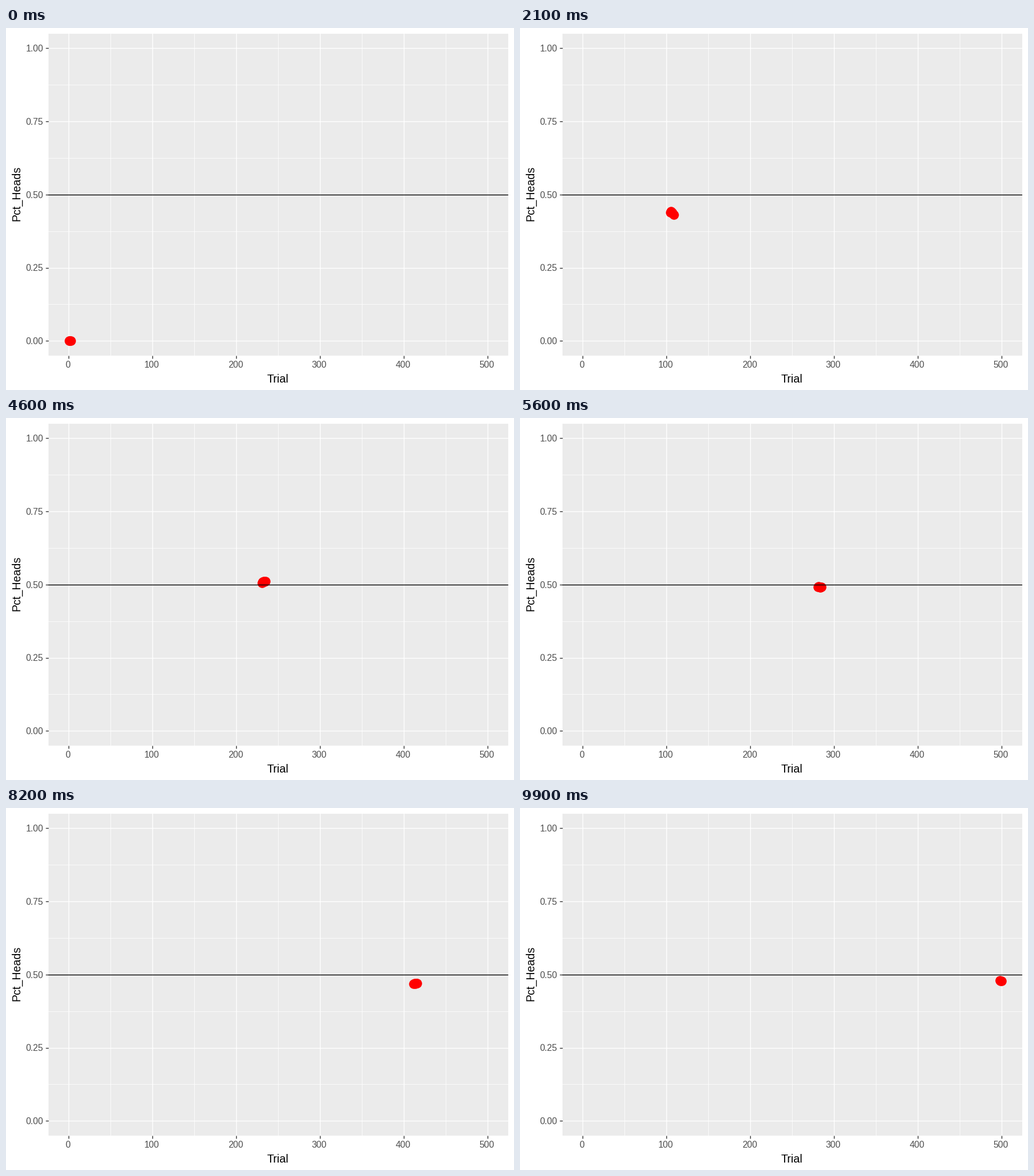
A matplotlib script that plays this animation: 885x632 px, repeating every 10 s.

```python
import numpy as np
import matplotlib.pyplot as plt
from matplotlib.animation import FuncAnimation

W, H, DPI = 885, 632, 100
LEFT, RIGHT, TOP, BOTTOM = 73.6, 875.2, 9.8, 571.9
FRAMES, TRIALS = 100, 500
PX = 72 / DPI  # points per pixel
TICK, TITLE = 15.6, 19.6

plt.rcParams["font.family"] = ["Liberation Sans", "DejaVu Sans"]

# (trial, heads so far) at the turning points; flips between are spread evenly.
TURNS = [(3, 0), (13, 7), (67, 25), (106, 47), (109, 47), (156, 77), (181, 89),
         (187, 89), (235, 120), (283, 139), (325, 157), (403, 186), (428, 205),
         (459, 213), (497, 239), (500, 239)]
trial = np.arange(1, TRIALS + 1)
pct = np.round(np.interp(trial, *zip(*TURNS))) / trial
shown_in = np.round((trial - 1) * (FRAMES - 1) / (TRIALS - 1)).astype(int)

fig = plt.figure(figsize=(W / DPI, H / DPI), dpi=DPI, facecolor="white")
ax = fig.add_axes([LEFT / W, 1 - BOTTOM / H, (RIGHT - LEFT) / W, (BOTTOM - TOP) / H],
                  facecolor="#EBEBEB")
pad = 0.05 * (TRIALS - 1)
ax.set_xlim(1 - pad, TRIALS + pad)
ax.set_ylim(-0.05, 1.05)
ax.spines[:].set_visible(False)

x_major, y_major = np.arange(0, 501, 100), np.arange(0, 1.01, 0.25)
ax.set_xticks(x_major)
ax.set_yticks(y_major)
ax.tick_params(length=4.9 * PX, width=1.4 * PX, color="#333333",
               labelbottom=False, labelleft=False)


def grid(xs, ys, width):
    for x in xs:
        ax.axvline(x, color="white", lw=width * PX, zorder=1)
    for y in ys:
        ax.axhline(y, color="white", lw=width * PX, zorder=1)


def label(x, y, text, size, color, **kw):
    fig.text(x / W, 1 - y / H, text, fontsize=size * PX, color=color,
             va="baseline", **kw)


grid(x_major[:-1] + 50, y_major[:-1] + 0.125, 0.8)
grid(x_major, y_major, 1.4)
ax.axhline(0.5, color="black", lw=1.4 * PX, zorder=4)

x_scale = (RIGHT - LEFT) / (TRIALS - 1 + 2 * pad)
y_scale = (BOTTOM - TOP) / 1.1
for v in x_major:
    label(LEFT + (v - 1 + pad) * x_scale - 0.8, 592.8, f"{v}", TICK, "#4D4D4D",
          ha="center")
for v in y_major:
    label(64.8, BOTTOM - (v + 0.05) * y_scale + 5.8, f"{v:.2f}", TICK, "#4D4D4D",
          ha="right")
label((LEFT + RIGHT) / 2 - 0.8, 619, "Trial", TITLE, "black", ha="center")
label(24.4, (TOP + BOTTOM) / 2 - 1.5, "Pct_Heads", TITLE, "black", ha="center",
      rotation=90, rotation_mode="anchor")

dots, = ax.plot([], [], "o", color="red", ms=16.6 * PX, mew=0, zorder=3)


def update(i):
    now = shown_in == i
    dots.set_data(trial[now], pct[now])
    return dots,


anim = FuncAnimation(fig, update, frames=FRAMES, interval=100, repeat=True,
                     repeat_delay=0)
plt.show()
```
